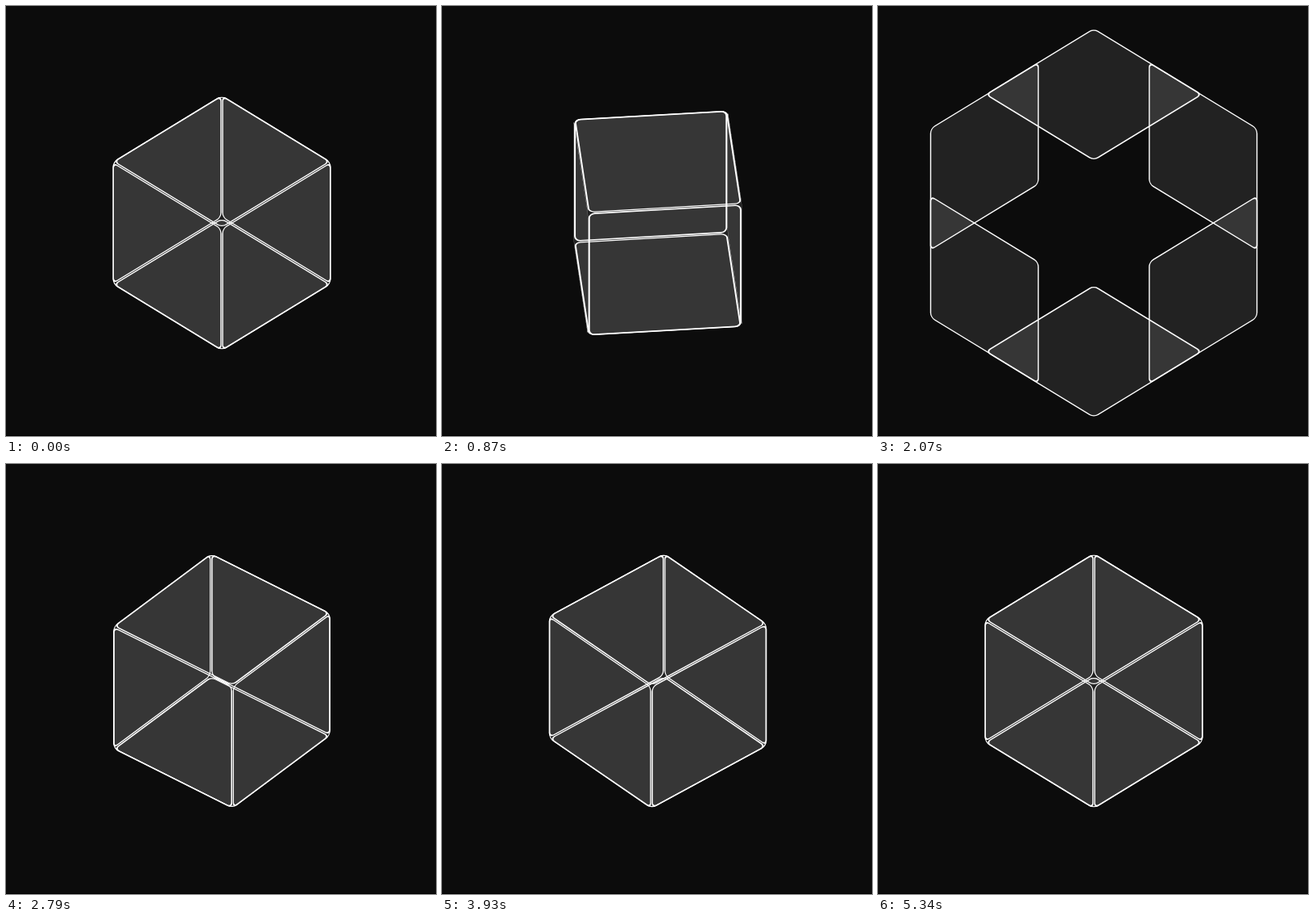
These frames come from a looping animation (534 by 533 pixels, 5.37 s). An HTML page with a canvas:

```html
<!DOCTYPE html>
<html lang="en">
<head>
<meta charset="utf-8">
<title>Unfolding cube</title>
<style>
  html, body { margin: 0; height: 100%; overflow: hidden; background: #0c0c0c; }
  canvas { display: block; }
</style>
</head>
<body>
<canvas width="534" height="533"></canvas>
<script>
const ctx = document.querySelector('canvas').getContext('2d');
const LOOP = 5370, CYCLE = 2700, STEP = 30;
const SIZE = 191, BORDER = 2, RADIUS = 8;
const CENTER = [268, 269];
const TILT = 37.5 * Math.PI / 180;
const SPIN_START = 51, SPIN_TIME = 1350;
const OPEN = 1266, CLOSE = 2076, MOVE_TIME = 540, SIDE_DELAY = 45;
const NEAR = 96, FAR_SIDE = 192, FAR_CAP = 200.8;

// cubic-bezier(.25, .1, .25, 1)
function ease(x) {
  if (x <= 0) return 0;
  if (x >= 1) return 1;
  let lo = 0, hi = 1;
  for (let i = 0; i < 24; i++) {
    const u = (lo + hi) / 2;
    if (0.75 * u - 0.75 * u * u + u ** 3 < x) lo = u; else hi = u;
  }
  return 0.3 * lo + 2.4 * lo * lo - 1.7 * lo ** 3;
}

function distance(time, far) {
  const out = ease((time - OPEN) / MOVE_TIME) - ease((time - CLOSE) / MOVE_TIME);
  return NEAR + (far - NEAR) * out;
}

function roundedSquare(inset) {
  const side = SIZE - 2 * inset;
  ctx.beginPath();
  ctx.roundRect(-side / 2, -side / 2, side, side, RADIUS - inset);
}

// A face spanned by the projected axes u and v, pushed out along n.
function drawFace(u, v, n, dist) {
  ctx.setTransform(...u, ...v, CENTER[0] + n[0] * dist, CENTER[1] + n[1] * dist);
  roundedSquare(0);
  ctx.fillStyle = 'rgba(255, 255, 255, 0.09)';
  ctx.fill();
  roundedSquare(BORDER / 2);
  ctx.stroke();
}

function draw(time) {
  const phase = time % LOOP % CYCLE;
  const angle = Math.PI / 4 + 2 * Math.PI * ease((phase - SPIN_START) / SPIN_TIME);
  const sin = Math.sin(angle), cos = Math.cos(angle);
  const x = [cos, -sin * Math.sin(TILT)];
  const y = [0, Math.cos(TILT)];
  const z = [sin, cos * Math.sin(TILT)];
  const side = distance(phase - SIDE_DELAY, FAR_SIDE);
  const cap = distance(phase, FAR_CAP);

  ctx.resetTransform();
  ctx.fillStyle = '#0c0c0c';
  ctx.fillRect(0, 0, 534, 533);
  ctx.fillStyle = '#000';
  ctx.fillRect(0, 532, 534, 1);
  ctx.strokeStyle = '#fff';
  ctx.lineWidth = BORDER;
  for (const sign of [-1, 1]) {
    drawFace(x, z, y, sign * cap);
    drawFace(x, y, z, sign * side);
    drawFace(z, y, x, sign * side);
  }
}

const start = performance.now();
function tick() {
  const elapsed = performance.now() - start;
  draw(Math.floor((elapsed + 1) / STEP) * STEP);
  requestAnimationFrame(tick);
}
tick();
</script>
</body>
</html>
```
